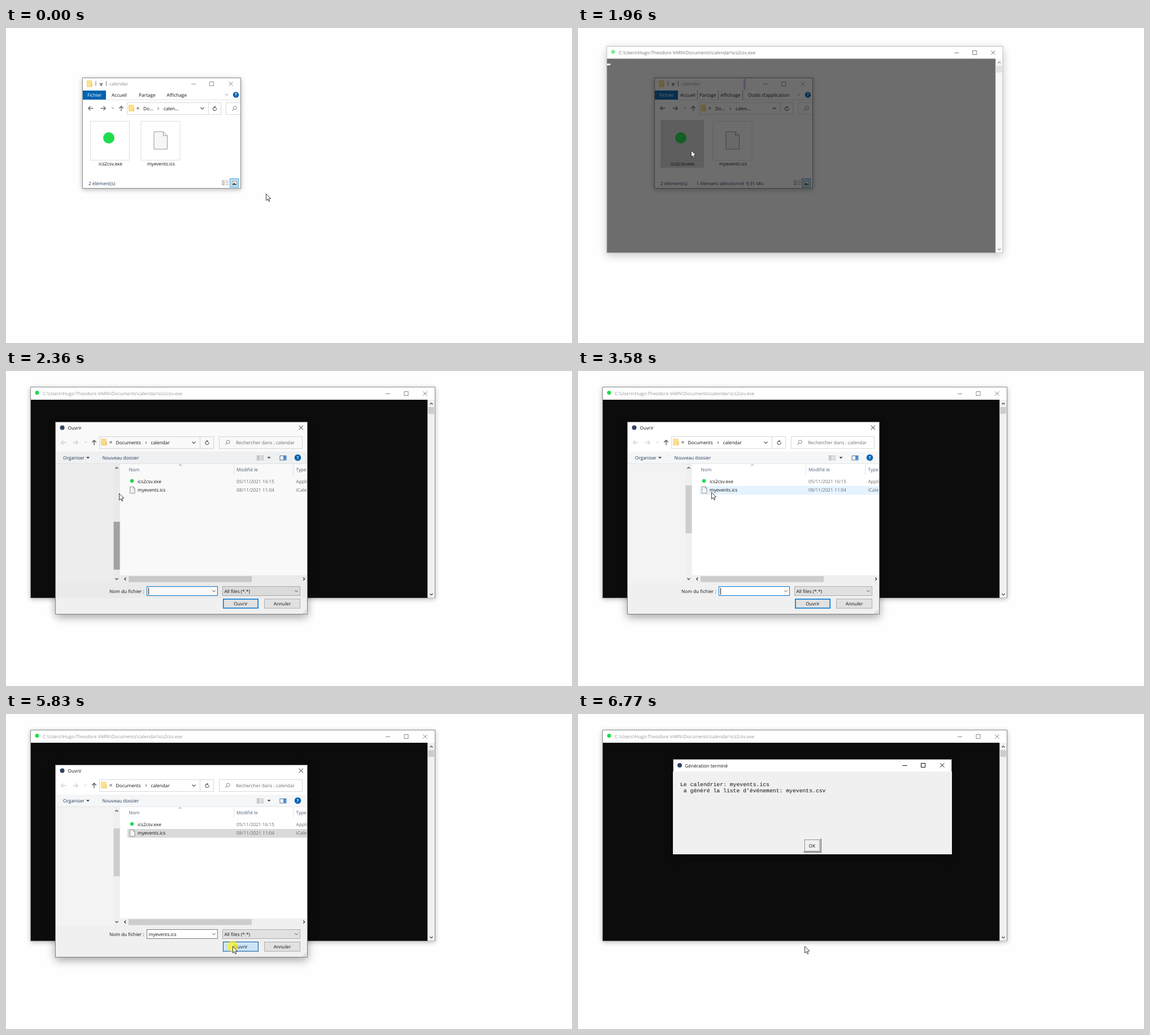
Recreate the animation shown at these times as an HTML page with a canvas. Size 1002 by 559 pixels, loop 8000 ms.

```html
<!DOCTYPE html>
<html lang="fr">
<head>
<meta charset="utf-8">
<title>ics2csv</title>
<style>
html, body { margin: 0; width: 100%; height: 100%; overflow: hidden; background: #fefefe; }
canvas { display: block; }
</style>
</head>
<body>
<canvas id="stage" width="1002" height="559"></canvas>
<script>
const W = 1002, H = 559, LOOP = 8000;
const SANS = '"Open Sans", "Noto Sans", sans-serif';
const MONO = '"Liberation Mono", monospace';
const BLUE = '#0063b1', FOCUS = '#0078d7', NAVY = '#1e395b', GREEN = '#1fdc4c';
const PATH = 'C:\\Users\\Hugo-Theodore VARN\\Documents\\calendar\\ics2csv.exe';

const screen = document.getElementById('stage').getContext('2d');
const layer = document.createElement('canvas');
layer.width = W;
layer.height = H;
const layerCtx = layer.getContext('2d');
let g = screen;

// ---------- drawing helpers ----------
function box(x, y, w, h, fill, stroke, lw = 1) {
  if (fill) { g.fillStyle = fill; g.fillRect(x, y, w, h); }
  if (stroke) {
    g.strokeStyle = stroke;
    g.lineWidth = lw;
    g.strokeRect(x + lw / 2, y + lw / 2, w - lw, h - lw);
  }
}

function poly(pts, stroke, lw = 1, fill) {
  g.beginPath();
  pts.forEach(([x, y]) => g.lineTo(x, y));
  if (fill) { g.closePath(); g.fillStyle = fill; g.fill(); }
  if (stroke) { g.strokeStyle = stroke; g.lineWidth = lw; g.stroke(); }
}

function dot(x, y, r, fill) {
  g.beginPath();
  g.arc(x, y, r, 0, Math.PI * 2);
  g.fillStyle = fill;
  g.fill();
}

function text(s, x, y, color = '#111', opt = {}) {
  g.font = `${opt.weight || 400} ${opt.size || 8.25}px ${opt.font || SANS}`;
  g.textAlign = opt.align || 'left';
  g.textRendering = 'geometricPrecision';
  g.fillStyle = color;
  g.fillText(s, x, y);
}
const centered = (s, x, y, color) => text(s, x, y, color, { align: 'center' });

// Rotates points about (x, y) by quarter turns: 0 right, 1 down, 2 left, 3 up
function turned(x, y, q, pts) {
  const c = [1, 0, -1, 0][q], s = [0, 1, 0, -1][q];
  return pts.map(([a, b]) => [x + a * c - b * s, y + a * s + b * c]);
}
const chevron = (x, y, r, q, color, lw = 1) =>
  poly(turned(x, y, q, [[-r / 2, -r], [r / 2, 0], [-r / 2, r]]), color, lw);

function arrow(x, y, q, color) {
  poly(turned(x, y, q, [[-4.5, 0], [4, 0]]), color, 1.2);
  poly(turned(x, y, q, [[0.5, -3.7], [4.2, 0], [0.5, 3.7]]), color, 1.2);
}

const triangle = (x, y, r, color) =>
  poly([[x - r, y - r / 2], [x + r, y - r / 2], [x, y + r / 2]], null, 1, color);

function folder(x, y) {
  box(x, y, 9, 11.5, '#ffe08c', '#f2cf72', 0.8);
  box(x + 7.5, y + 5, 2.5, 6.5, '#f6d070');
}

function page(x, y, w, h, fold) {
  poly([[x, y], [x + w - fold, y], [x + w, y + fold], [x + w, y + h], [x, y + h], [x, y]],
    '#8c8c8c', 0.9, '#f6f6f6');
  poly([[x + w - fold, y], [x + w - fold, y + fold], [x + w, y + fold]], '#8c8c8c', 0.9);
}

function help(x, y, r) {
  dot(x, y, r, BLUE);
  text('?', x, y + 2.9, '#fff', { align: 'center', weight: 700, size: 8 });
}

function lens(x, y, color) {
  g.beginPath();
  g.arc(x + 1.3, y - 1.2, 3, 0, Math.PI * 2);
  g.strokeStyle = color;
  g.lineWidth = 0.9;
  g.stroke();
  poly([[x - 0.8, y + 1], [x - 4, y + 4]], color);
}

function refresh(x, y) {
  g.beginPath();
  g.arc(x, y + 0.4, 3, -0.4, Math.PI * 1.5);
  g.strokeStyle = '#555';
  g.lineWidth = 1.1;
  g.stroke();
  poly([[x - 0.5, y - 4.6], [x + 2.8, y - 2.6], [x - 0.5, y - 0.8]], null, 1, '#555');
}

function listIcon(x, y) {
  for (let i = 0; i < 3; i++) {
    box(x, y + i * 3.2, 5, 2, null, '#999', 0.7);
    box(x + 6.5, y + i * 3.2 + 0.5, 2.4, 1, '#888');
    box(x + 9.7, y + i * 3.2 + 0.5, 2.4, 1, '#888');
  }
}

function captionButtons(xMin, xMax, xClose, y, color) {
  box(xMin - 4, Math.round(y), 8, 1, color);
  box(xMax - 4, Math.round(y) - 4, 8, 8, null, color);
  cross(xClose, y, color);
}
function cross(x, y, color) {
  poly([[x - 3.7, y - 3.7], [x + 3.7, y + 3.7]], color);
  poly([[x + 3.7, y - 3.7], [x - 3.7, y + 3.7]], color);
}

function frame(x, y, w, h, border, active) {
  g.save();
  g.shadowColor = active ? 'rgba(0,0,0,.36)' : 'rgba(0,0,0,.28)';
  g.shadowBlur = active ? 15 : 8;
  g.shadowOffsetY = active ? 5 : 2;
  box(x, y, w, h, '#fff');
  g.restore();
  box(x, y, w, h, '#fff', border);
}

// ---------- timing ----------
// Sampled progress: n equal ticks between a and b, eased like a sine
function glide(t, a, b, n) {
  if (t < a) return 0;
  const tick = Math.min(n, Math.floor((t - a) / (b - a) * (n - 1) + 0.01) + 1);
  return (1 - Math.cos(Math.PI * tick / n)) / 2;
}

// Window opening in ticks of 67 ms
const opening = (t, start, rate) =>
  t < start ? 0 : Math.min(1, rate * (Math.floor((t - start + 2) / 67) + 1));

const between = (t, a, b) => t >= a && t < b;
const inside = (p, x, y, w, h) => p.x >= x && p.x < x + w && p.y >= y && p.y < y + h;

function pointerAt(t) {
  const legs = [
    [570, 1350, 12, -260, -77],
    [3110, 3640, 9, 37, -2],
    [4790, 5550, 12, 164, 197]
  ];
  const p = { x: 460, y: 294 };
  for (const [a, b, n, dx, dy] of legs) {
    const k = glide(t, a, b, n);
    p.x += dx * k;
    p.y += dy * k;
  }
  return p;
}

const clicking = t => [[1420, 1560], [1630, 1840], [4180, 4520], [5630, 6040]]
  .some(([a, b]) => between(t, a, b));

// ---------- windows ----------
function tile(x, label, mark, hover, state) {
  if (state) {
    box(x - 3, 163, 77, 85, state === 'on' ? '#cce8ff' : '#d9d9d9', state === 'on' ? '#99d1ff' : null);
  } else if (hover) {
    box(x - 3, 163, 77, 85, '#e5f1fd');
  }
  box(x, 165, 70, 70, state || hover ? null : '#fff', hover || state ? '#c9d9e8' : '#dedede');
  mark();
  centered(label, x + 36, 243.5);
}

function explorer(t, p) {
  const picked = t >= 1420, active = between(t, 1420, 1890);
  const hoverable = t < 1890;
  const dim = active ? '#222' : '#8f8f8f';
  frame(135, 88, 281, 197, '#8a8a8a', active);

  folder(143, 93);
  box(158.5, 94, 1, 9, '#777');
  box(165.5, 98, 6, 1, '#333');
  triangle(168.5, 101.5, 2.5, '#333');
  box(177, 94, 1, 9, '#777');
  text('calendar', 183, 102, dim);
  captionButtons(332, 364, 398, 99, dim);

  box(136, 111, 41, 16, BLUE);
  text('Fichier', 144, 122, '#fff');
  if (picked) {
    box(293, 90, 4, 20, '#dcb8f0');
    text('Accueil', 181, 122);
    text('Partage', 215, 122);
    text('Affichage', 252, 122);
    text("Outils d'application", 301, 122);
    [211, 248, 291].forEach(x => box(x, 111, 1, 16, '#999'));
  } else {
    text('Accueil', 187, 122);
    text('Partage', 235, 122);
    text('Affichage', 284.5, 122);
  }
  chevron(390.5, 118.5, 2.6, 1, '#888');
  help(407, 118.5, 5.2);
  box(136, 127, 279, 1, '#e2e2e2');

  arrow(150, 142.5, 2, '#555');
  arrow(172, 142.5, 0, '#555');
  chevron(189, 142, 1.8, 1, '#666');
  arrow(204, 143, 3, '#555');
  box(214, 132, 167, 22, '#fff', '#d9d9d9');
  box(358, 132, 1, 22, '#d9d9d9');
  folder(217, 136.5);
  text('«', 231, 144.8, '#222', { size: 10 });
  text('Do...', 243, 146);
  chevron(269.5, 143, 2, 0, '#444');
  text('calen...', 279, 146);
  chevron(347.5, 142.5, 3, 1, '#555', 1.2);
  refresh(369.5, 143);
  box(389, 132, 26, 22, '#fff');
  poly([[415, 132.5], [389.5, 132.5], [389.5, 153.5], [415, 153.5]], '#d9d9d9');
  lens(404, 143, '#777');

  const state = !picked ? null : active ? 'on' : 'off';
  tile(149, 'ics2csv.exe', () => dot(182, 195, 10, GREEN),
    hoverable && inside(p, 146, 163, 77, 85), state);
  tile(238.5, 'myevents.ics', () => page(262, 184, 23.5, 31, 7),
    hoverable && inside(p, 236, 163, 77, 85));

  text('2 élément(s)', 146, 278.5, NAVY);
  if (picked) {
    text('1 élément sélectionné', 209.5, 278.5, NAVY);
    text('9,91 Mo', 297.5, 278.5, NAVY);
  }
  listIcon(382, 270.5);
  box(396, 267, 16, 16, '#bfe3f5', '#4aa3d8');
  box(400, 271.5, 9, 7.5, '#f4f4f4', '#777', 0.8);
  poly([[401, 278], [403.5, 274.5], [408, 278]], null, 1, '#444');
}

function terminal(t) {
  const active = between(t, 1890, 2160) || between(t, 6300, 6500);
  const dim = active ? '#111' : '#979797';
  frame(43, 28, 717, 375, '#8d8d8d', active);
  dot(55, 38.5, 3.5, GREEN);
  text(PATH, 65, 43, dim);
  captionButtons(676, 708.5, 742, 40, active ? '#111' : '#888');
  box(44, 51, 702.5, 351.5, '#0c0c0c');
  if (t < 2160) box(44, 60, 6, 3, '#fff');
  box(746.5, 51, 12.5, 351.5, '#f0f0f0');
  box(747.5, 64, 10.5, 12, '#cdcdcd');
  chevron(753, 58, 2.5, 3, '#444', 1.2);
  chevron(753, 396.5, 2.5, 1, '#444', 1.2);
}

function fileRow(name, date, type, y) {
  text(name, 233, y);
  text(date, 408, y, '#6d6d6d');
  g.save();
  g.beginPath();
  g.rect(500, y - 12, 33, 20);
  g.clip();
  text(type, 513.5, y, '#6d6d6d');
  g.restore();
}

function dropdown(x, w, fill, border) {
  box(x, 382, w, 17, fill, border);
  chevron(x + w - 7, 390.5, 2.8, 1, '#555');
}

function openDialog(t, p) {
  frame(87, 90, 447, 342, '#7d7d7d', true);
  dot(99.5, 100.5, 4, '#33425f');
  text('Ouvrir', 109.5, 104);
  cross(522.3, 100.5, '#222');

  arrow(102, 127, 2, '#ccc');
  arrow(123, 127, 0, '#ccc');
  chevron(141, 126.5, 1.8, 1, '#bbb');
  arrow(156, 127, 3, '#444');
  box(165, 116, 203, 22, '#fff', '#d9d9d9');
  box(343, 116, 1, 22, '#d9d9d9');
  folder(168.5, 120.5);
  text('«', 183, 129, '#222', { size: 10 });
  text('Documents', 194.5, 130);
  chevron(248, 127, 2, 0, '#444');
  text('calendar', 256.5, 130);
  chevron(332.5, 127, 3, 1, '#555', 1.2);
  refresh(356, 127);
  box(377, 116, 148, 22, '#fff', '#d9d9d9');
  lens(392, 127, '#777');
  text('Rechercher dans : calendar', 407, 130, '#6d6d6d');

  box(88, 143, 445, 21.5, '#f5f6f7');
  box(88, 164, 445, 1, '#e4e6e8');
  text('Organiser', 101, 157, NAVY);
  triangle(145, 154, 3, NAVY);
  text('Nouveau dossier', 170.5, 157, NAVY);
  listIcon(444, 150);
  triangle(465.5, 154, 3, NAVY);
  box(484.5, 150, 12, 8.5, '#fff', '#4a6f9c');
  box(491, 151, 4.5, 6.5, '#3f8fd9');
  help(516.5, 153.7, 5.8);

  // side pane
  box(88, 165, 102, 211, '#f3f3f3');
  box(190, 165, 12, 211, '#f0f0f0');
  if (t < 2420) box(190.5, 267.5, 11, 85, '#a6a6a6');
  else box(190.5, 203, 11, 85, '#cdcdcd');
  chevron(196, 172, 2.5, 3, '#444', 1.2);
  chevron(196, 369, 2.5, 1, '#444', 1.2);

  // file list
  text('Nom', 217.5, 178, '#4c607a');
  text('Modifié le', 408, 178, '#4c607a');
  text('Type', 513.5, 178, '#4c607a');
  box(403, 166, 1, 18, '#e3e3e3');
  box(508, 166, 1, 18, '#e3e3e3');
  chevron(308.5, 167, 2.5, 3, '#777', 0.9);
  const over = inside(p, 215, 204, 318, 16);
  if (t >= 5630) box(215, 204, 318, 15.5, '#d9d9d9');
  else if (t >= 4180) box(215, 204, 318, 15.5, '#cce8ff', over ? '#99d1ff' : null);
  else if (over) box(215, 204, 318, 15.5, '#e5f3ff');
  dot(223, 195, 3.2, GREEN);
  page(219.5, 205.5, 8.5, 11.5, 2.5);
  fileRow('ics2csv.exe', '05/11/2021 16:15', 'Appli', 199);
  fileRow('myevents.ics', '08/11/2021 11:04', 'iCale', 214.3);
  box(202, 362.5, 331, 13.5, '#f0f0f0');
  box(217, 364, 218, 10.5, '#cdcdcd');
  chevron(211, 369, 2.5, 2, '#333', 1.2);
  chevron(527.5, 369, 2.5, 0, '#333', 1.2);

  // footer
  box(88, 376, 445, 55, '#f0f0f0');
  text('Nom du fichier :', 183, 394);
  const named = t >= 4250;
  dropdown(249, 126, '#fff', named ? '#7a7a7a' : FOCUS);
  if (named) text('myevents.ics', 252.5, 394);
  else if (Math.floor((t - 2230) / 532) % 2 === 0) box(252, 385, 1, 12, '#111');
  const overFilter = inside(p, 384, 382, 137, 17);
  dropdown(383, 138, overFilter ? '#e5f1fb' : '#e1e1e1', overFilter ? FOCUS : '#adadad');
  text('All files (*.*)', 386.5, 394);
  const overOpen = inside(p, 384, 404, 63, 18);
  if (t >= 5630) box(384, 404, 63, 17.5, '#cce4f7', '#005499');
  else if (overOpen) box(384, 404, 63, 17.5, '#e5f1fb', FOCUS);
  else box(384, 404, 63, 17.5, '#e1e1e1', FOCUS, 1.6);
  centered('Ouvrir', 415.5, 415.8);
  box(457, 404, 64, 17.5, '#e1e1e1', '#adadad');
  centered('Annuler', 489, 415.8);
  for (let i = 0; i < 3; i++)
    for (let j = 0; j <= i; j++) box(530 - j * 2.4, 424 + i * 2.4, 1.3, 1.3, '#b5b5b5');
}

function message() {
  frame(168, 80, 494, 169, '#666', true);
  dot(180, 91, 4, '#33425f');
  text('Génération terminé', 189.5, 94.5);
  captionButtons(578.5, 611, 644.7, 91, '#111');
  box(168, 102, 494, 147, '#f0f0f0');
  const mono = { font: MONO, size: 9.76 };
  text('Le calendrier: myevents.ics', 181, 128, '#111', mono);
  text(" a généré la liste d'événement: myevents.csv", 181, 139.3, '#111', mono);
  box(399, 221, 32, 25, '#f0f0f0');
  box(399, 221, 31, 1, '#fff');
  box(399, 221, 1, 24, '#fff');
  box(399, 244.5, 32, 1.5, '#777');
  box(429.5, 221, 1.5, 25, '#777');
  box(400.5, 222.5, 28, 21.5, null, '#888');
  centered('OK', 414.3, 236.6);
}

// Paints a window as one sheet, with opacity and a zoom about its centre
function sheet(k, cx, cy, paint) {
  if (k <= 0) return;
  if (k >= 1) return paint();
  g = layerCtx;
  g.clearRect(0, 0, W, H);
  paint();
  g = screen;
  const s = 1 - 0.13 * (1 - k) ** 2;
  g.save();
  g.globalAlpha = k;
  g.translate(cx, cy);
  g.scale(s, s);
  g.drawImage(layer, -cx, -cy);
  g.restore();
}

function pointer(p, t) {
  if (clicking(t)) dot(p.x, p.y + 0.5, 9.7, 'rgba(255,243,0,.62)');
  const shape = [[0, 0], [0, 11.8], [2.7, 9.3], [4.6, 13.6], [6.4, 12.8], [4.5, 8.7], [8.2, 8.4]];
  const pts = shape.map(([x, y]) => [p.x + 0.5 + x, p.y + 0.3 + y]);
  poly([...pts, pts[0]], '#222', 0.9, '#fff');
}

function draw(t) {
  const p = pointerAt(t);
  box(0, 0, W, H, '#fefefe');
  const term = opening(t, 1890, 0.3);
  if (term < 1) explorer(t, p);
  sheet(term, 401.5, 215.8, () => terminal(t));
  const dialog = t < 5970 ? opening(t, 2225, 0.325) : t < 6040 ? 0.6 : t < 6100 ? 0.2 : 0;
  sheet(dialog, 310.5, 261, () => openDialog(t, p));
  sheet(opening(t, 6500, 0.3), 415, 164.5, message);
  pointer(p, t);
}

const start = performance.now();
function tick() {
  draw((performance.now() - start) % LOOP);
  requestAnimationFrame(tick);
}
tick();
</script>
</body>
</html>
```
